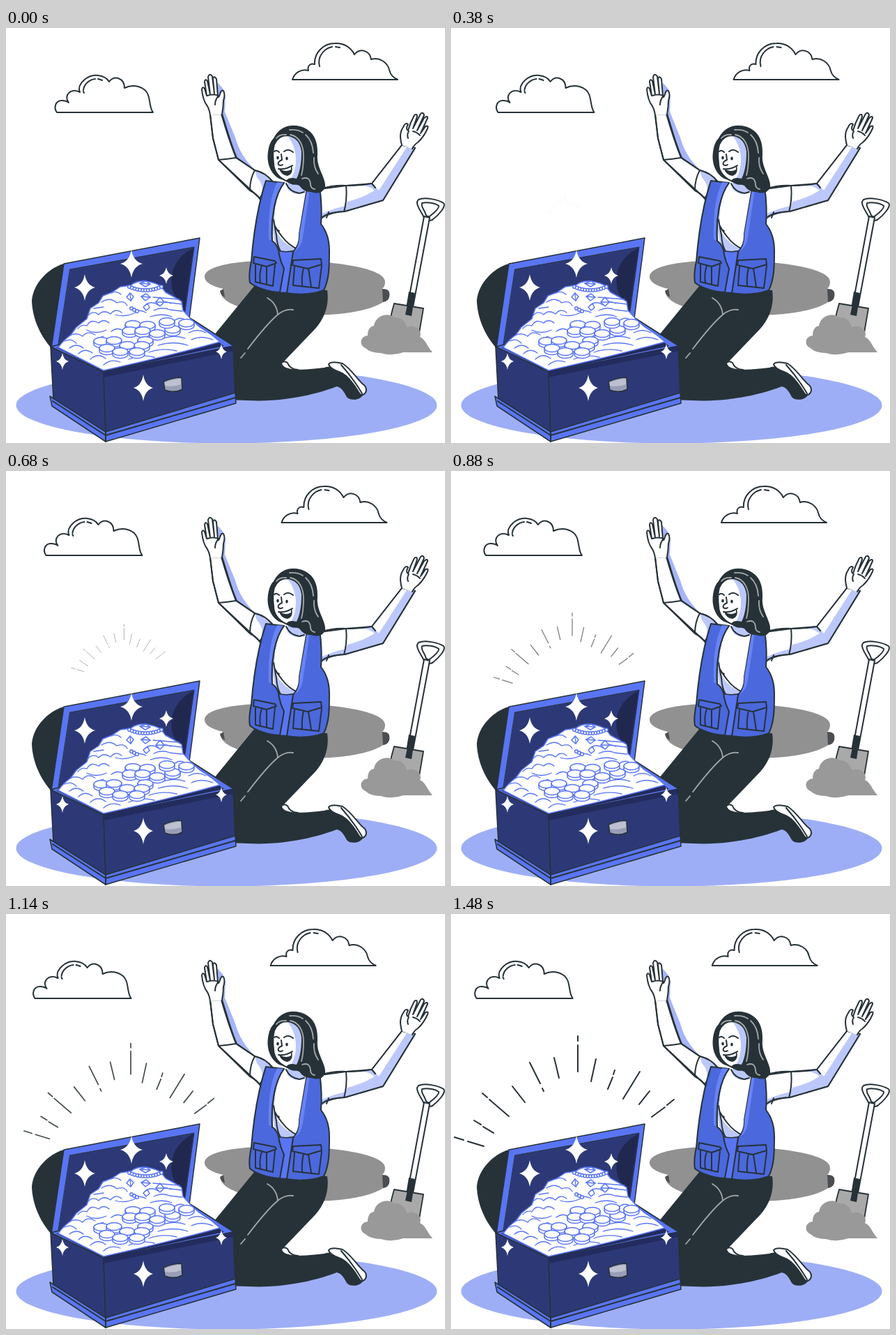
An HTML page that plays this animation: 630 by 595 pixels, repeating every 1500 ms.

```html
<!DOCTYPE html>
<html lang="en">
<head>
<meta charset="utf-8">
<title>Treasure found</title>
<style>
html, body { margin: 0; width: 100%; height: 100%; overflow: hidden; background: #fff; }
svg { display: block; width: 630px; height: 595px; }
.ln { fill: none; stroke: #263238; stroke-width: 2; }
.w { fill: #fff; stroke: #263238; stroke-width: 2; }
.k { fill: #263238; }
.b { fill: #5975f3; stroke: #263238; stroke-width: 1.5; }
.v { fill: #4b68dc; stroke: #263238; stroke-width: 2; }
.d { fill: #2d3976; }
.s { fill: #bcc8fb; }
.g { fill: none; stroke: #a5a8aa; stroke-width: 1.8; }
.gold { fill: #fff; stroke: #5975f3; stroke-width: 1.5; }
.thin { fill: none; stroke: #5975f3; stroke-width: 1.3; }
</style>
</head>
<body>
<svg viewBox="0 0 630 595" stroke-linecap="round" stroke-linejoin="round">
  <ellipse cx="316.500" cy="541" rx="302" ry="54.500" fill="#9eaef6"/>

  <g id="clouds">
    <path class="w" d="M73 121C68 114 71 104 80 104Q86 104 90 107C82 97 93 85 106 92C101 80 118 66 132 68Q143 69 148 77C156 67 170 72 170 86C184 79 200 85 204 96C207 104 206 115 211 121Z"/>
    <path class="ln" d="M111 89C112 80 120 74 128 73M132 73Q136 74 138 75M112 93L111 91"/>
    <path class="w" d="M411 74C414 64 424 58 434 61C432 54 437 50 443 52C442 36 455 22 472 22C485 21 495 28 500 38C508 28 522 32 524 45C536 41 548 50 550 60C552 68 556 71 562 74Z"/>
    <path class="ln" d="M450 55C446 41 457 29 468 27M473 27L479 28"/>
  </g>
  <g id="rays" fill="none" stroke="#263238" stroke-width="2"></g>

  <g id="hole">
    <path fill="#919191" d="M285 357C285 339 340 332 405 333C475 334 544 345 544 364Q544 370 540 374L550 378C552 399 500 412 432 412C370 412 312 400 308 380L312 374C295 370 285 364 285 357Z"/>
    <path fill="#4a4e51" d="M540 374C551 374 551 380 550 386Q548 392 541 393ZM312 374L307 377Q308 383 314 386Z"/>
  </g>

  <g id="shovel">
    <path class="w" d="M592 246C601 242 620 246 628 251C632 256 621 268 612 275Q605 278 600 272C596 263 589 256 590 249Z"/>
    <path class="w" d="M597 251C604 249 616 251 621 255C622 259 613 266 608 270Q603 271 602 266C600 260 595 256 597 251Z"/>
    <path class="w" d="M600 270L608 272L584 400L576 400Z"/>
    <path class="k" d="M578 378L587 380L583 410L573 408Z"/>
    <path fill="#a9a9a9" stroke="#263238" stroke-width="1.800" d="M557 395L599 402L593 437Q580 449 566 442Q549 426 553 410Z"/>
    <path class="k" d="M577 392L585 394L582 413L573 411Z"/>
    <path fill="#999" d="M516 459C506 455 508 442 519 441C519 430 525 427 528 427C530 412 549 407 557 415C568 414 574 422 575 429C588 424 598 434 594 443C602 446 604 456 612 465L570 465Q554 471 538 466Q523 466 516 459Z"/>
  </g>

  <g id="legs">
    <path class="w" d="M394 481Q399 476 404 480Q407 489 419 490L416 496L392 494Z"/>
    <path class="k" d="M357 369L461 376C464 396 458 415 444 431L396 481C399 493 432 490 456 487L476 486L484 510C455 523 402 537 347 534L318 533L320 460L298 441Z"/>
    <path class="k" d="M455 488C463 483 472 486 481 491L514 523C511 533 495 536 489 529C484 519 480 512 465 513Z"/>
    <path class="w" d="M463 482C466 478 475 479 483 481C497 490 505 506 515 513Q519 519 515 524Q510 529 506 522C497 507 488 496 478 493Q464 488 463 482Z"/>
    <path class="ln" d="M481 483C489 492 501 507 511 524"/>
    <path class="g" d="M375 387C384 392 389 400 390 411M347 460C360 443 378 421 390 411Q401 402 412 404M337 473L343 466"/>
  </g>

  <g id="arms">
    <path fill="#a6b4f8" d="M300 76Q313 84 315 98L314 120L329 157C334 175 343 190 358 204L350 209L318 190L304 120Z"/>
    <path class="w" d="M293 124L297 158L305 189L364 244L382 219Q368 206 357 204L330 186Q319 158 309 123Z" stroke="none"/>
    <path class="s" d="M357 204Q372 208 382 219L366 243Q372 227 360 214Z"/>
    <path class="ln" d="M293 124L297 158L305 189L350 233Q360 238 365 246M305 189Q318 188 330 186M331 186C322 165 317 145 310 123M331 186L357 204C352 213 350 223 350 233M357 204Q374 208 382 220"/>
    <path class="w" d="M293 125Q292 117 289 112C284 106 282 98 281 88Q282 83 285 87L288 97L285 77Q286 72 289 76L293 95L290 70Q292 64 296 69L299 94L297 72Q299 68 302 73L304 98Q305 101 307 95Q309 88 312 90Q315 95 312 104Q312 113 310 124"/>
    <path class="ln" d="M289 97Q297 94 305 97M305 97Q300 103 300 110"/>

    <path class="w" d="M450 231L488 226L525 223L568 168L587 172L541 247L486 263Q461 264 448 277Z" stroke="none"/>
    <path class="s" d="M490 249Q511 244 529 233Q521 226 507 225L525 223Q545 197 567 170L586 172L541 247L486 263Q462 264 451 276L451 267Q472 258 487 255Z"/>
    <path fill="#fff" d="M526 223L568 169L575 171L535 233Z"/>
    <path class="ln" d="M450 231Q470 225 488 226Q508 226 525 223L568 168M453 272Q462 264 486 263L541 247L587 172M488 226Q490 246 485 263M525 223L530 229M463 264L460 272"/>
    <path class="w" d="M568 168C566 159 564 151 570 142Q573 135 577 138Q573 145 577 147Q580 136 586 125Q590 122 590 127L584 144L595 123Q599 120 600 125L590 147L600 129Q605 125 605 129L595 151L602 141Q607 139 605 144Q599 157 591 164Q586 167 583 173"/>
    <path class="ln" d="M578 148Q575 153 577 158M584 148Q591 150 594 154"/>
  </g>

  <g id="torso">
    <path fill="#fff" d="M384 217L440 222L432 325L382 325Z"/>
    <path class="s" d="M389 222L398 221C387 243 384 263 386 288Q395 309 417 317L414 322L388 322L379 268Z"/>
    <path class="ln" d="M386 284C390 292 393 295 397 300Q405 311 420 318M384 275L388 297Q389 312 394 320M389 289L392 291"/>
    <path class="s" d="M404 219L431 225L429 236Q415 242 404 231Z"/>
    <path class="ln" d="M402 223Q407 235 421 237L428 235"/>
    <path class="b" d="M390 319Q404 323 418 318L413 380L392 379Z"/>
    <path class="v" d="M373 219L399 222C385 240 380 275 382 305Q392 313 392 325Q394 335 399 345L393 379C374 378 357 371 350 365Q348 353 352 335C355 297 361 255 373 219Z"/>
    <path fill="#6883f6" d="M389 221L399 222C385 240 380 275 382 305L377 303C376 270 379 242 389 221Z"/>
    <path class="ln" d="M399 222C385 240 380 275 382 305"/>
    <path class="v" d="M432 230L450 228Q454 255 452 281Q464 296 464 319C464 342 464 360 456 376Q432 385 403 380L412 321Q422 311 421 295Z"/>
    <path fill="#6883f6" d="M432 232L436 232L426 300Q424 315 413 321Q422 311 421 295Z"/>
    <path class="ln" d="M356 328L386 334L388 337L374 342L355 337ZM358 339L358 364L383 370L386 339M374 342L374 367M367 341Q363 352 365 365M412 333L452 331L453 339L433 345L411 340ZM414 342L412 369L449 373L453 341M427 344Q424 356 425 370M434 345L438 371"/>
  </g>

  <g id="head">
    <path class="k" d="M384 158C392 142 407 137 422 141C440 146 448 160 447 181C445 201 460 215 458 229Q452 240 438 235Q428 236 421 226L407 221L392 216C377 207 373 189 377 172Q379 163 384 158Z"/>
    <path class="w" d="M385 167Q391 154 403 154Q420 156 423 178Q423 202 417 216L404 220C394 216 384 207 384 194Q382 178 385 167Z" stroke-width="1"/>
    <path class="s" d="M404 155Q421 157 424 177Q424 206 415 219L407 219C419 203 420 173 404 155Z"/>
    <path class="k" d="M402 219Q406 213 417 216Q423 218 420 224Q410 227 402 219ZM392 202Q402 203 410 197Q413 209 404 212Q395 211 392 202Z"/>
    <path fill="#fff" d="M395 203Q403 203 409 199L409 203Q402 207 395 203Z"/>
    <ellipse class="k" cx="390" cy="186" rx="1.800" ry="2.600"/>
    <ellipse class="k" cx="403" cy="187" rx="1.800" ry="2.600"/>
    <path class="ln" d="M385 177Q388 174 392 178M399 177Q405 172 412 178M395 181L396 189Q389 192 391 196Q394 198 397 196M391 202Q402 203 411 197" stroke-width="1.700"/>
    <path class="g" d="M388 158Q393 152 402 153M408 153C421 155 427 169 427 183Q427 200 424 211M407 146Q419 145 426 150M430 153Q440 162 441 179M442 186Q441 199 448 209M425 216Q436 212 437 224Q437 230 443 231"/>
  </g>

  <g id="chest">
    <path class="k" d="M83 338C61 344 39 366 37 391C38 418 50 442 65 459Z"/>
    <path class="b" d="M83 338L278 301L263 417L65 459Z"/>
    <path class="d" d="M92 346L270 314L256 413L75 456Z" stroke="#263238"/>
    <path fill="#20284f" d="M269 315C243 329 233 350 239 376L255 412Z"/>
    <path class="b" d="M64 457L255 410L327 456L140 494Z"/>
    <path fill="#222b5c" d="M72 458L252 411L313 456L140 493Z"/>
    <path class="d" d="M64 457L140 493L143 582L68 533Z" stroke="#263238" stroke-width="1.500"/>
    <path class="d" d="M140 493L326 456L329 527L143 582Z" stroke="#263238" stroke-width="1.500"/>
    <path fill="#232c5e" d="M140 493L326 456L326 463L140 501Z"/>
    <path class="b" d="M63 528L143 579L329 523L330 538L143 593L66 542Z"/>
    <path class="ln" d="M143 579L143 593M67 535L143 584L329 530" stroke-width="1.200"/>
    <path fill="#999eb8" stroke="#263238" stroke-width="1.500" d="M226 507Q239 501 252 501L253 518Q242 524 228 519Z"/>
    <path fill="#bdc0d0" d="M228 508Q240 503 251 503L251 511Q239 515 228 513Z"/>
  </g>

  <g id="gold">
    <path class="gold" d="M75 458Q82 448 93 440L101 429L116 417L121 402L133 394L139 384L152 379L164 371L179 369Q187 362 201 363Q214 365 222 370L229 379L242 386L252 392L254 405L265 417L277 428L295 440L307 450Q235 470 140 491Z"/>
    <path class="thin" d="M103 431Q109 424 116 427Q122 416 133 423Q140 416 148 423M117 413Q125 404 133 411Q140 403 150 410Q157 401 166 408M137 393Q149 385 159 394Q170 390 174 398M151 380Q158 376 165 382M157 411Q170 415 184 409Q190 402 201 408M199 398Q208 390 218 397Q227 389 236 395M211 386L249 389M219 392L253 396M212 405Q224 399 235 404L253 406M90 442Q100 435 110 442Q117 433 128 440M84 449Q94 444 101 452M91 459Q101 451 111 459M104 467Q113 458 124 466M121 475Q132 465 143 474M140 483Q150 474 164 479M151 435Q160 428 169 434M207 414Q224 408 238 414M240 421Q249 412 260 420M223 446Q241 439 257 445M218 455Q241 448 261 455M205 465Q225 458 245 463M176 475Q195 467 213 472M262 437Q275 430 287 437M266 447Q280 440 297 447M126 402L140 400M116 433Q129 440 144 433M130 445L140 442"/>
    <g id="coins"></g>
    <g id="beads"></g>
    <path class="gold" d="M173 386L178 380L183 385L179 391ZM194 385L201 381L207 386L200 391ZM215 393L221 386L227 393L221 399ZM197 400L203 395L206 401L201 405ZM192 366L201 363L207 367L200 371Z"/>
    <path class="thin" d="M178 380L179 391M194 385L207 386M215 393L227 393M192 366L207 367"/>
  </g>
  <g id="stars" fill="#fff"></g>
</svg>

<script>
const $ = id => document.getElementById(id);
const LOOP = 1500, DRIFT = 36.3;
const HUB = [160, 253.5];

// Ray strokes at full size: x1, y1, x2, y2
const RAYS = [
  [5, 320, 18, 324], [24, 326, 47, 333],
  [33, 296, 43, 302], [46, 305, 61, 314],
  [45, 257, 52, 263], [55, 266, 83, 290],
  [88, 247, 106, 270],
  [113, 213, 128, 243], [131, 250, 133, 254],
  [148, 206, 155, 235],
  [182, 175, 182, 182], [182, 188, 182, 226],
  [208, 208, 201, 240],
  [235, 224, 233, 230], [232, 234, 225, 251],
  [271, 226, 247, 265],
  [285, 254, 270, 273],
  [320, 266, 310, 274], [307, 277, 288, 291]
];
$('rays').innerHTML = RAYS.map(([a, b, c, d]) => `<path d="M${a} ${b}L${c} ${d}"/>`).join('');

const coin = ([x, y]) =>
  `<path class="gold" d="M${x - 11} ${y}v4a11 5.5 0 0 0 22 0v-4"/>` +
  `<ellipse class="gold" cx="${x}" cy="${y}" rx="11" ry="5.5"/>`;
$('coins').innerHTML = [
  [182, 425], [203, 426], [178, 434], [196, 434], [217, 438], [239, 432], [231, 421], [259, 423],
  [137, 449], [155, 448], [200, 448], [174, 455], [195, 455], [145, 459], [164, 464], [188, 464]
].map(coin).join('');

let beads = '';
for (let i = 0; i < 13; i++) {
  const u = i / 6 - 1;
  beads += `<circle class="gold" cx="${200 + 23 * u}" cy="${376 - 5 * u * u}" r="2.3"/>`;
}
for (let i = 0; i < 3; i++) beads += `<circle class="gold" cx="${180 + i * 4}" cy="${402 + i * 2}" r="2.3"/>`;
$('beads').innerHTML = beads;

const star = ([x, y, w, h]) => {
  const p = w * 0.17, q = h * 0.17;
  return `<path d="M${x} ${y - h}Q${x + p} ${y - q} ${x + w} ${y}Q${x + p} ${y + q} ${x} ${y + h}` +
    `Q${x - p} ${y + q} ${x - w} ${y}Q${x - p} ${y - q} ${x} ${y - h}Z"/>`;
};
$('stars').innerHTML = [
  [113, 372, 15, 19], [180, 338, 16, 20], [230, 355, 10, 12],
  [81, 478, 9, 12], [197, 516, 14, 19], [309, 464, 8, 11]
].map(star).join('');

function draw(ms) {
  const k = (1 - Math.cos(Math.PI * (ms % LOOP) / LOOP)) / 2;
  $('clouds').setAttribute('transform', `translate(${-DRIFT * k} 0)`);
  $('rays').setAttribute('transform', `translate(${HUB[0] * (1 - k)} ${HUB[1] * (1 - k)}) scale(${k})`);
  $('rays').setAttribute('opacity', k);
}

const start = performance.now();
function tick() {
  draw(performance.now() - start);
  requestAnimationFrame(tick);
}
draw(0);
requestAnimationFrame(tick);
</script>
</body>
</html>
```
